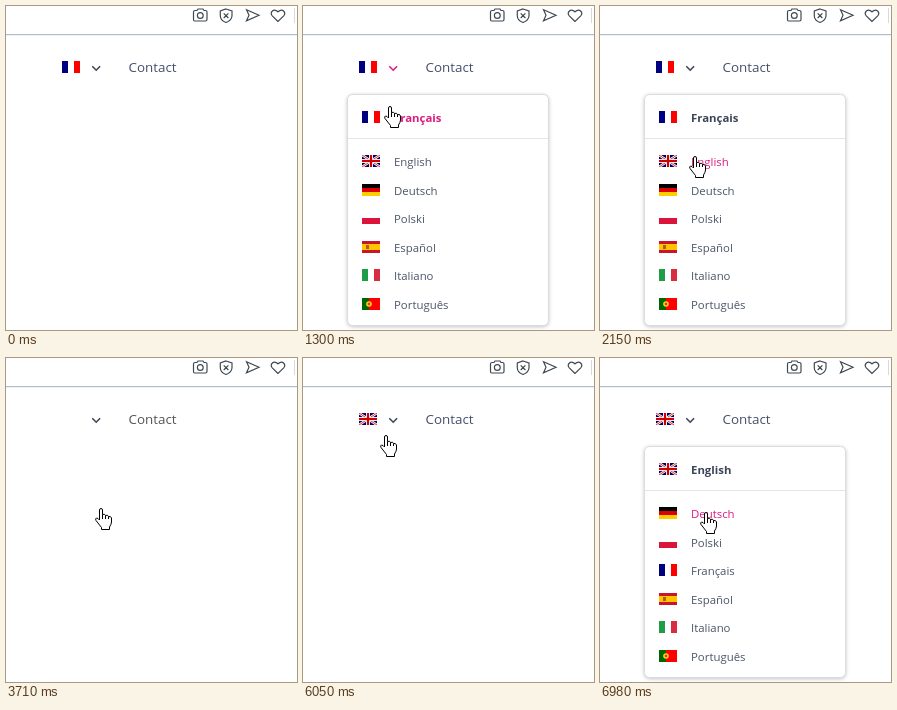
Animation, 291 px wide and 324 px high, one loop 8000 ms. Source, as an HTML page with a canvas:

```html
<!DOCTYPE html>
<html lang="en">
<head>
<meta charset="utf-8">
<title>Language menu</title>
<style>
  html, body { margin: 0; width: 100%; height: 100%; overflow: hidden; background: #fff; }
  canvas { display: block; }
</style>
</head>
<body>
<canvas id="stage" width="291" height="324"></canvas>
<script>
const ctx = document.getElementById('stage').getContext('2d');
const LOOP = 8000;
const PINK = '#dc1c80', INK = '#4a5568', DARK = '#3c4658';
const FONT = '"Open Sans", "Noto Sans", sans-serif';

// Pointer movements: start, sampling step, then [time, x, y] stops
const MOVES = [
  [530, 75, [[530, 160, 190], [830, 95, 77], [1055, 82, 64]]],
  [1220, 76, [[1220, 82, 79], [1296, 81, 100], [1828, 89, 150]]],
  [5650, 76, [[5650, 96, 161]]],
  [5820, 76, [[5820, 95, 140], [6048, 77, 77], [6276, 80, 64]]],
  [6510, 78, [[6510, 79, 76], [6978, 100, 154]]]
];
const MENUS = [
  { open: 905, close: 3710, names: ['Français', 'English', 'Deutsch', 'Polski', 'Español', 'Italiano', 'Português'] },
  { open: 6124, close: LOOP, names: ['English', 'Deutsch', 'Polski', 'Français', 'Español', 'Italiano', 'Português'] }
];

const HAND = new Path2D('M4.5 12V2Q4.5.5 6 .5T7.5 2V6.5Q10 5.5 10.5 7.5Q13 6.5 13.5 8.5Q16 8 16.5 10V14Q16.5 16 14.5 19V21.5H6.5V19.5L1 12.5Q0 10.5 1.5 10Q3 10 4.5 12ZM7.5 6.5V11M10.5 7.5V11M13.5 8.5V11');
const BEAM = new Path2D('M1 .5H3L4 1.5 5 .5H7M4 1.5V15.5M1 16.5H3L4 15.5 5 16.5H7');
const CHEVRON = new Path2D('M86.3 60.3L90.2 64.2 94.1 60.3');
const ICONS = new Path2D(
  'M189 4.5H191L192 3H197L198 4.5H199.5Q201 4.5 201 6V13.5Q201 15 199.5 15H188.5Q187.5 15 187.5 13.5V6Q187.5 4.5 189 4.5Z' +
  'M197.2 9.5A2.9 2.9 0 1 1 191.4 9.5A2.9 2.9 0 1 1 197.2 9.5' +
  'M220 3L226 5V10Q225.5 14.5 220 16.5Q214.5 14.5 214.3 10V5ZM217.7 7.3L222.4 12M222.4 7.3L217.7 12' +
  'M240.5 3.8L253 9.3 240.5 14.8 243 9.3Z' +
  'M272 15.5L266.3 9.8C263.5 6.5 267.5 1.5 272 5.8C276.5 1.5 280.5 6.5 277.7 9.8Z');

function rect(color, x, y, w, h) {
  ctx.fillStyle = color;
  ctx.fillRect(x, y, w, h);
}

function disc(color, x, y, r) {
  ctx.fillStyle = color;
  ctx.beginPath();
  ctx.arc(x, y, r, 0, 7);
  ctx.fill();
}

function line(path, color, width = 1) {
  ctx.strokeStyle = color;
  ctx.lineWidth = width;
  ctx.stroke(path);
}

function label(text, x, y, size, color, weight = 400) {
  ctx.font = `${weight} ${size}px ${FONT}`;
  ctx.fillStyle = color;
  ctx.fillText(text, x, y);
}

const columns = (...colors) => colors.forEach((c, i) => rect(c, i * 6, 0, 6, 12));
const rows = (...colors) => colors.forEach((c, i) => rect(c, 0, i * 12 / colors.length, 18, 12 / colors.length));

const FLAGS = {
  'Français': () => columns('#000080', '#fff', '#f00'),
  'Italiano': () => columns('#1f9c46', '#fff', '#d82c40'),
  'Deutsch': () => rows('#000', '#d00', '#ffce00'),
  'Polski': () => rows('#fff', '#dc143c'),
  'Español': () => {
    rows('#c8152a', '#ffc400', '#ffc400', '#c8152a');
    rect('#b5562b', 4, 4, 3, 4);
  },
  'Português': () => {
    rect('#f00', 0, 0, 18, 12);
    rect('#060', 0, 0, 7, 12);
    disc('#ffe000', 7, 6, 2.8);
    disc('#e33', 7, 6, 1.4);
  },
  'English': () => {
    const diagonals = new Path2D('M0 0L18 12M18 0L0 12');
    rect('#006', 0, 0, 18, 12);
    line(diagonals, '#fff', 2.4);
    line(diagonals, '#c00', 0.8);
    rect('#fff', 7, 0, 4, 12);
    rect('#fff', 0, 4, 18, 4);
    rect('#c00', 7.9, 0, 2.2, 12);
    rect('#c00', 0, 4.9, 18, 2.2);
  }
};

function flag(name, x, y) {
  ctx.save();
  ctx.translate(x, y);
  ctx.beginPath();
  ctx.rect(0, 0, 18, 12);
  ctx.clip();
  FLAGS[name]();
  ctx.restore();
}

function pointerAt(t) {
  if (t < 530 || (t >= 5500 && t < 5650)) return null;
  const [start, step, stops] = MOVES.filter(m => m[0] <= t).pop();
  const time = start + Math.floor((t - start) / step) * step;
  const next = stops.findIndex(s => s[0] > time);
  const b = next < 0 ? stops[stops.length - 1] : stops[next];
  const a = next < 0 ? b : stops[next - 1];
  const k = a === b ? 0 : (time - a[0]) / (b[0] - a[0]);
  return {
    x: Math.round(a[1] + (b[1] - a[1]) * k),
    y: Math.round(a[2] + (b[2] - a[2]) * k),
    beam: t < 800 || (t >= 5650 && t < 6000)
  };
}

function drawToolbar() {
  rect('#a9bfcd', 0, 28, 291, 1);
  rect('#eef2f5', 0, 29, 291, 1);
  rect('#d5d8dc', 288, 2, 1, 15);
  line(ICONS, '#3f4850', 1.2);
}

function drawMenu({ names, open }, t, pointer) {
  ctx.save();
  ctx.globalAlpha = Math.min(1, (Math.floor((t - open) / 76) + 1) / 3);
  const panel = new Path2D();
  panel.roundRect(44.5, 88.5, 201, 231, 5);
  ctx.save();
  ctx.shadowColor = 'rgba(0,0,0,.28)';
  ctx.shadowBlur = 4;
  ctx.shadowOffsetY = 1;
  ctx.fillStyle = '#fff';
  ctx.fill(panel);
  ctx.restore();
  line(panel, '#d9dce0');
  rect('#e3e5e8', 45, 132, 200, 1);
  names.forEach((name, i) => {
    const top = i ? 149 + Math.round((i - 1) * 28.6) : 105;
    const hover = i ? Math.abs(pointer.y + 1 - top - 6) < 14 : pointer.y > 87 && pointer.y < 132;
    flag(name, 59, top);
    label(name, 91, top + 11, 11.4, hover ? PINK : i ? INK : DARK, i ? 400 : 700);
  });
  ctx.restore();
}

function drawPointer({ x, y, beam }, clicked) {
  if (clicked) disc('rgba(255,255,0,.47)', x + 5, y + 1, 12);
  ctx.save();
  if (beam) {
    ctx.translate(x, y - 8);
    line(BEAM, '#000');
  } else {
    ctx.translate(x, y);
    ctx.fillStyle = '#fff';
    ctx.fill(HAND);
    line(HAND, '#000');
  }
  ctx.restore();
}

function draw(t) {
  const pointer = pointerAt(t);
  const menu = MENUS.find(m => t >= m.open && t < m.close);
  rect('#fff', 0, 0, 291, 324);
  drawToolbar();
  if (t < 3710) flag('Français', 56, 55);
  else if (t >= 4720) flag('English', 56, 55);
  line(CHEVRON, menu && pointer.y < 105 ? PINK : DARK, 1.6);
  label('Contact', 122.5, 66, 13.4, t >= 3710 && t < 4260 ? '#555' : '#444f6b');
  if (menu) drawMenu(menu, t, pointer);
  if (pointer) drawPointer(pointer, t >= 2000 && t < 2150);
}

function tick() {
  draw(performance.now() % LOOP);
  requestAnimationFrame(tick);
}
tick();
</script>
</body>
</html>
```
